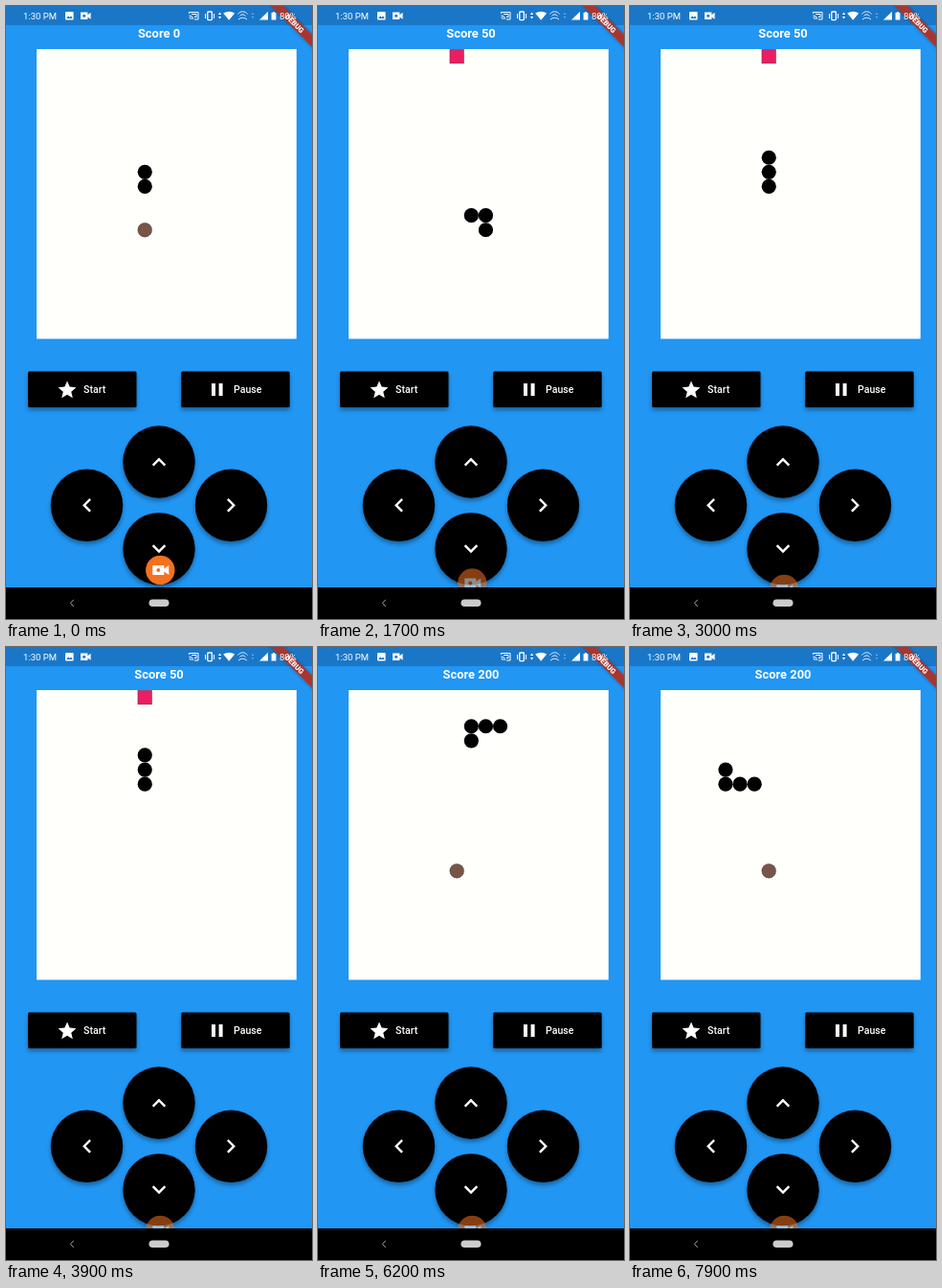
Write an HTML page that moves like this. It is 320x640 px and loops after 8000 ms.

```html
<!DOCTYPE html>
<html lang="en">
<head>
<meta charset="utf-8">
<title>Snake</title>
<style>
  html, body { margin: 0; width: 100%; height: 100%; overflow: hidden; background: #2196f3; }
  svg { display: block; width: 320px; height: 640px; }
  text { font-family: Roboto, "Open Sans", sans-serif; fill: #fff; }
  .label { font-size: 10.6px; font-weight: 500; }
  .status { font-size: 9.5px; }
  .line { fill: none; stroke: #fff; }
</style>
</head>
<body>
<svg viewBox="0 0 320 640">
  <defs>
    <filter id="shadow" x="-20%" y="-20%" width="140%" height="150%">
      <feDropShadow dx="0" dy="3" stdDeviation="2.2" flood-opacity=".35"/>
    </filter>
    <filter id="soft" x="-20%" y="-60%" width="140%" height="220%">
      <feDropShadow dx="0" dy="0" stdDeviation="1.6" flood-opacity=".45"/>
    </filter>
    <path id="chevron" d="M-6 2.3 0-3.7 6 2.3 4.6 3.7 0-.9-4.6 3.7Z" fill="#fff"/>
  </defs>

  <rect width="320" height="640" fill="#2196f3"/>
  <rect width="320" height="20" fill="#1a77c8"/>
  <text id="score" x="160" y="33" font-size="12.9" font-weight="700" text-anchor="middle"></text>

  <rect x="32" y="45" width="271.8" height="302.5" fill="#fffffc"/>
  <g id="food" stroke="#000" stroke-opacity=".5" stroke-width=".6">
    <circle cx="145.2" cy="233.8" r="7.4" fill="#795548"/>
    <rect x="137.9" y="45.3" width="14.6" height="14.6" fill="#e91e63"/>
  </g>
  <g id="snake"></g>

  <g filter="url(#shadow)">
    <rect x="23" y="381.5" width="113.5" height="37.5" rx="1.5"/>
    <rect x="183.2" y="381.5" width="113.5" height="37.5" rx="1.5"/>
  </g>
  <path transform="translate(64 400.8) scale(.94)" fill="#fff"
        d="M0 5.3 6.2 9 4.5 2 10-2.8 2.8-3.4 0-10-2.8-3.4-10-2.8-4.5 2-6.2 9Z"/>
  <text class="label" x="81" y="404">Start</text>
  <path d="M215 394h4v13h-4zM222.6 394h4v13h-4z" fill="#fff"/>
  <text class="label" x="238" y="404">Pause</text>

  <g id="pad"></g>

  <g id="recorder">
    <circle r="15.2" fill="#f4711f"/>
    <path d="M-8-5H4V-1.5L9-5V5L4 1.5V5H-8Z" fill="#fff"/>
    <circle cx="-2" r="2" fill="#f4711f"/>
  </g>

  <rect y="607" width="320" height="33"/>
  <path d="M70.8 619.8 67.4 623.4 70.8 627" class="line" style="stroke:#aaa"/>
  <rect x="149.5" y="619.5" width="21" height="7.6" rx="3.8" fill="#ccc"/>

  <g transform="translate(320 0) rotate(45)">
    <rect x="-40" y="21.1" width="80" height="9.1" fill="#a9352f" filter="url(#soft)"/>
    <text y="28.4" font-size="7.6" font-weight="900" text-anchor="middle">DEBUG</text>
  </g>

  <text class="status" x="18" y="13.8">1:30 PM</text>
  <rect x="62" y="6" width="8.6" height="8.6" rx="1" fill="#fff"/>
  <path d="M63.2 13 65.2 10.3 66.6 12 68 10.2 69.6 13Z" fill="#1a77c8"/>
  <path d="M78 6.5H85.4V9.2L88.6 6.8V13.8L85.4 11.4V14H78Z" fill="#fff"/>
  <circle cx="81.7" cy="10.3" r="1.5" fill="#1a77c8"/>

  <g class="line">
    <path d="M191.5 8V6.5H201V14H197M191.5 10a4 4 0 0 1 4 4M191.5 12a2 2 0 0 1 2 2"/>
    <path d="M194 8.5H199V11.5H197"/>
    <rect x="210.8" y="6" width="4.6" height="8.6" rx=".8" stroke-width="1.3"/>
    <path d="M208.6 8V13M217.6 8V13"/>
    <path d="M242.5 8.5a6 6 0 0 1 10 0M244.5 10.5a3.6 3.6 0 0 1 6 0M243 14Q247.5 10.5 252 14" opacity=".85"/>
  </g>
  <path d="M222 9 223.6 6.6 225.2 9ZM222 11 223.6 13.4 225.2 11Z" fill="#fff"/>
  <path d="M227.2 7.6Q233.2 4 239.2 7.6L233.2 14.8Z" fill="#fff"/>
  <path d="M257 9 258 7 259 9ZM257 11 258 13 259 11Z" fill="#fff" opacity=".5"/>
  <path d="M265 14.4 274 5.8V14.4Z" fill="#fff"/>
  <path d="M277.6 7H279V6H281V7H282.4V14.5H277.6Z" fill="#fff"/>
  <text class="status" x="286" y="13.6" font-size="9">80%</text>
</svg>
<script>
const LOOP = 8000, FRAME = 100, CELL = 15.1, LEFT = 32, TOP = 45;
const $ = id => document.getElementById(id);

function add(parent, tag, attrs) {
  const node = document.createElementNS("http://www.w3.org/2000/svg", tag);
  for (const key in attrs) node.setAttribute(key, attrs[key]);
  return parent.appendChild(node);
}

// Direction pad: centre and chevron angle.
[[160, 476, 0], [84.5, 521.3, -90], [235.5, 521.3, 90], [160, 566.7, 180]].forEach(([x, y, turn]) => {
  add($("pad"), "circle", { cx: x, cy: y, r: 37.7, filter: "url(#shadow)" });
  add($("pad"), "use", { href: "#chevron", transform: `translate(${x} ${y}) rotate(${turn}) scale(1.2)` });
});

// Head path, starting with the tail and head cells.
const DIRS = { U: [0, -1], D: [0, 1], L: [-1, 0], R: [1, 0] };
const trail = [[7, 8], [7, 9]];
const moves = "DDDRRULL" + "U".repeat(11) + "RRRDDLLDDDLLLLDRR";
for (const move of moves) {
  const [x, y] = trail[trail.length - 1], [dx, dy] = DIRS[move];
  trail.push([x + dx, y + dy]);
}

// The snake speeds up at each meal.
const MEALS = [3, 19], PACE = [300, 252, 185], SCORES = [0, 50, 200];
const stepTimes = [];
let clock = 82;
for (let n = 1; n <= moves.length; n++) {
  stepTimes.push(clock);
  clock += PACE[MEALS.filter(m => n >= m).length];
}

const dots = Array.from({ length: 4 }, () => add($("snake"), "circle", { r: 7.6 }));
const [brownFood, pinkFood] = $("food").children;

// Piecewise linear value through [time, value] stops.
function along(stops, t) {
  const i = stops.findIndex(s => s[0] > t);
  if (i === 0) return stops[0][1];
  if (i < 0) return stops[stops.length - 1][1];
  const [t0, a] = stops[i - 1], [t1, b] = stops[i];
  return a + (b - a) * (t - t0) / (t1 - t0);
}
const SLIDE = [[1200, 589], [1700, 602.5], [2000, 609]];
const FADE = [[1000, 1], [1500, 0.55]];

function draw(t) {
  const steps = stepTimes.filter(s => s <= t).length;
  const eaten = MEALS.filter(m => steps >= m).length;
  dots.forEach((dot, i) => {
    const shown = i < 2 + eaten;
    dot.style.display = shown ? "" : "none";
    if (!shown) return;
    const [x, y] = trail[steps + 1 - i];
    dot.setAttribute("cx", LEFT + (x + 0.5) * CELL);
    dot.setAttribute("cy", TOP + (y + 0.5) * CELL);
  });
  brownFood.style.display = eaten === 1 ? "none" : "";
  pinkFood.style.display = eaten === 1 ? "" : "none";
  $("score").textContent = "Score " + SCORES[eaten];
  $("recorder").setAttribute("transform", `translate(161.3 ${along(SLIDE, t)})`);
  $("recorder").setAttribute("opacity", along(FADE, t));
}

const start = performance.now();
function tick() {
  const t = (performance.now() - start) % LOOP;
  draw(Math.floor(t / FRAME) * FRAME);
  requestAnimationFrame(tick);
}
tick();
</script>
</body>
</html>
```
